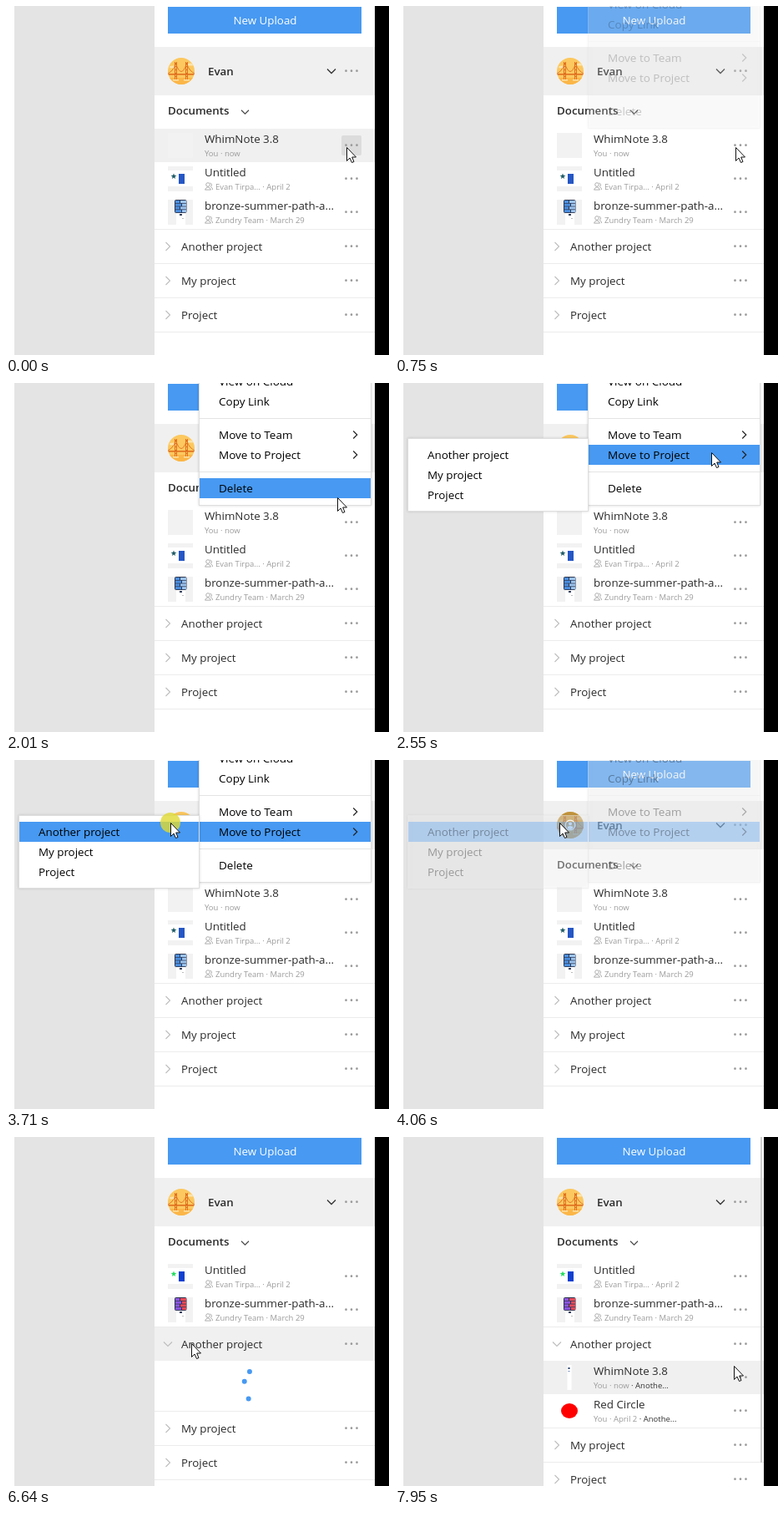
These frames come from a looping animation (459x418 px, 8000 ms). An HTML page with a canvas:

```html
<!DOCTYPE html>
<html lang="en">
<head>
<meta charset="utf-8">
<title>Move a document</title>
<style>
html, body { margin: 0; width: 100%; height: 100%; overflow: hidden; background: #fff; }
canvas { display: block; }
</style>
</head>
<body>
<canvas id="stage" width="459" height="418"></canvas>
<script>
const ctx = document.getElementById('stage').getContext('2d');
const LOOP = 8000;
const BLUE = '#4799f2', HOVER = '#f0f0f0', INK = '#2b2b2b', MUTED = '#9b9b9b';
const FACE = '"Open Sans", "Noto Sans", sans-serif';
const BODY = '13.35px ' + FACE, MENU = '13.5px ' + FACE;
const BOLD = '600 13.3px ' + FACE, SMALL = '9.5px ' + FACE;

const T = {
  press: 470, open: 750, sub: 2550, pick: 3710, close: 3860, moved: 4470,
  leave: 5370, tap: 6120, expand: 6250, loaded: 6970
};

// Pointer trips: start, number of 50 ms steps, end point, easing
const smooth = u => u * u * (3 - 2 * u);
const easeOut = u => u * (2 - u);
const HOME = [409, 169];
const trips = [
  { at: 1770, steps: 12, to: [380, 83], ease: smooth },
  { at: 2830, steps: 11, to: [198, 75], ease: smooth },
  { at: 5320, steps: 11, to: [223, 247], ease: easeOut },
  { at: 7590, steps: 8, to: [407, 274], ease: smooth }
];

const clamp = v => Math.max(0, Math.min(1, v));

function pointer(t) {
  let [x, y] = HOME;
  for (const m of trips) {
    if (t < m.at) break;
    const k = m.ease(clamp((Math.floor((t - m.at) / 50) + 1) / m.steps));
    x += (m.to[0] - x) * k;
    y += (m.to[1] - y) * k;
  }
  return [Math.round(x), Math.round(y)];
}

function rect(x, y, w, h, color) {
  ctx.fillStyle = color;
  ctx.fillRect(x, y, w, h);
}

function pill(x, y, w, h, r, color) {
  ctx.fillStyle = color;
  ctx.beginPath();
  ctx.roundRect(x, y, w, h, r);
  ctx.fill();
}

function disc(x, y, r, color, ry = r) {
  ctx.fillStyle = color;
  ctx.beginPath();
  ctx.ellipse(x, y, r, ry, 0, 0, 7);
  ctx.fill();
}

function line(points, color, width = 1) {
  ctx.strokeStyle = color;
  ctx.lineWidth = width;
  ctx.beginPath();
  points.forEach(([x, y], i) => i ? ctx.lineTo(x, y) : ctx.moveTo(x, y));
  ctx.stroke();
}

function text(s, x, y, font = BODY, color = INK) {
  ctx.font = font;
  ctx.fillStyle = color;
  ctx.fillText(s, x, y);
  return x + ctx.measureText(s).width;
}

function down(x, y, r, color, width) {
  line([[x - r, y - r / 2], [x, y + r / 2], [x + r, y - r / 2]], color, width);
}

function right(x, y, r, color, width) {
  line([[x - r / 2, y - r], [x + r / 2, y], [x - r / 2, y + r]], color, width);
}

function dots(y, p) {
  if (p && p[0] >= 402 && p[0] < 426 && Math.abs(p[1] - y) < 12)
    pill(402, y - 12, 24, 24, 2, '#dcdcdc');
  for (const x of [407.5, 414, 420.5]) disc(x, y - .3, 1.35, '#999');
}

function avatar(dim) {
  ctx.save();
  ctx.beginPath();
  ctx.arc(210, 78, 16, 0, 7);
  ctx.clip();
  rect(194, 62, 32, 32, '#fcc85f');
  disc(200, 73, 4, '#fde3a6', 1.5);
  disc(221, 70, 4, '#fde3a6', 1.5);
  rect(194, 86, 32, 8, '#fbb648');
  const red = '#e0701f';
  ctx.strokeStyle = red;
  ctx.lineWidth = .9;
  ctx.beginPath();
  ctx.moveTo(193, 81);
  ctx.quadraticCurveTo(200, 79, 203.5, 69);
  ctx.quadraticCurveTo(210, 88, 216.5, 69);
  ctx.quadraticCurveTo(220, 79, 227, 81);
  ctx.stroke();
  rect(194, 81, 32, 1.6, red);
  for (const x of [202, 215]) {
    rect(x, 67, 1, 21, red);
    rect(x + 2, 67, 1, 21, red);
    for (let y = 68; y < 88; y += 4) rect(x, y, 3, 1, red);
  }
  rect(200, 88, 7, 1.5, '#fde3a6');
  rect(213, 88, 7, 1.5, '#fde3a6');
  if (dim) {
    rect(194, 62, 32, 32, 'rgba(110,75,10,.42)');
    ctx.strokeStyle = '#fff';
    ctx.lineWidth = 1.3;
    ctx.beginPath();
    ctx.arc(210, 78, 5.8, 0, 7);
    ctx.stroke();
    disc(210, 76.5, 2, '#fff');
    disc(210, 81, 3.2, '#fff', 1.9);
  }
  ctx.restore();
}

function star(x, y, r, color) {
  ctx.fillStyle = color;
  ctx.beginPath();
  for (let i = 0; i < 10; i++) {
    const a = i * Math.PI / 5 - Math.PI / 2, q = i % 2 ? r * .42 : r;
    ctx.lineTo(x + q * Math.cos(a), y + q * Math.sin(a));
  }
  ctx.fill();
}

const thumbs = {
  blank(y) { rect(194, y, 30, 30, '#f2f2f2'); },
  flag(y, vivid) {
    rect(194, y, 30, 30, '#f2f2f2');
    rect(194, y + 5, 30, 19, '#fff');
    star(201, y + 12, 3.6, vivid ? '#1fdc5c' : '#1d5b66');
    rect(207, y + 9, 7, 12, vivid ? '#1040d0' : '#2556c4');
  },
  phone(y, vivid) {
    rect(194, y, 30, 30, '#f2f2f2');
    rect(204, y + 15, 11, 15, '#fff');
    pill(202, y, 14.5, 16, 2, '#2b3550');
    const set = vivid
      ? ['#8d55e0', '#f2c230', '#e84a58', '#3b7ff0', '#47b868']
      : ['#4b8fe0', '#ecc14e', '#9cc4ee', '#3a74c8', '#e3e6ec'];
    for (let i = 0; i < 8; i++) {
      const row = i >> 1, wide = (i + row) % 2;
      const x = i % 2 ? 216 - (wide ? 7 : 5) : 203;
      rect(x, y + 1 + row * 3.7, wide ? 7 : 5, 3, set[(i * 2 + row) % 5]);
    }
    rect(208, y + 17, 3, 2, '#35405c');
    rect(211, y + 22, 2, 1, '#bbb');
  },
  strip(y) {
    rect(206.5, y, 5, 30, '#fff');
    rect(207.5, y + 3, 2, 2, '#27406e');
    rect(207.5, y + 7, 2, 1, '#6b87b8');
  },
  circle(y) { disc(209, y + 15, 10, '#f00', 9); }
};

function people(x, y) {
  ctx.strokeStyle = MUTED;
  ctx.lineWidth = .8;
  ctx.beginPath();
  ctx.arc(x + 4, y - 5.5, 2.3, 0, 7);
  ctx.moveTo(x + .5, y + .6);
  ctx.quadraticCurveTo(x + 4, y - 6, x + 7.5, y + .6);
  ctx.closePath();
  ctx.moveTo(x + 6.5, y - 7.6);
  ctx.quadraticCurveTo(x + 10, y - 6, x + 7.4, y - 3);
  ctx.quadraticCurveTo(x + 9.8, y - 1.5, x + 9.6, y + .6);
  ctx.stroke();
}

const DOCS = [
  { name: 'WhimNote 3.8', note: 'You · now', thumb: 'blank' },
  { name: 'Untitled', note: 'Evan Tirpa... · April 2', thumb: 'flag', shared: true },
  { name: 'bronze-summer-path-a...', note: 'Zundry Team · March 29', thumb: 'phone', shared: true }
];
const INNER = [
  { name: 'WhimNote 3.8', note: 'You · now', thumb: 'strip', tail: true },
  { name: 'Red Circle', note: 'You · April 2', thumb: 'circle', tail: true }
];
const PROJECTS = ['Another project', 'My project', 'Project'];

function hoverRow(y, p) {
  if (p && p[0] > 178 && p[0] < 442 && p[1] >= y && p[1] < y + 40) rect(178, y, 264, 40, HOVER);
}

function docRow(d, y, p, vivid) {
  hoverRow(y, p);
  thumbs[d.thumb](y + 5, vivid);
  text(d.name, 238, y + 17);
  if (d.shared) people(238, y + 32.5);
  const end = text(d.note, d.shared ? 251 : 238, y + 33, SMALL, MUTED);
  if (d.tail) text(' · Anothe...', end, y + 33, SMALL, '#333');
  dots(y + 20, p);
}

// Dots enter at the bottom one after another and chase each other clockwise
function spinner(age) {
  for (let i = 0; i < 5; i++) {
    const a = age - i * 160;
    if (a < 0) break;
    const deg = 115 + 120 * easeOut(clamp(a / 560)) + Math.max(0, a - 450) * .1;
    const r = deg * Math.PI / 180;
    disc(310 + 24.8 * Math.cos(r), 298 + 24.8 * Math.sin(r), 3, BLUE);
  }
}

function panel(t, p) {
  rect(0, 0, 459, 418, '#fff');
  rect(10, 0, 168, 418, '#e4e4e4');
  rect(442, 0, 17, 418, '#000');
  rect(194, 1, 232, 32, BLUE);
  ctx.textAlign = 'center';
  text('New Upload', 310.5, 22, BODY, '#fff');
  ctx.textAlign = 'left';

  rect(178, 49, 264, 58, HOVER);
  avatar(t >= T.close && t < T.leave);
  text('Evan', 242, 83, BOLD);
  down(390, 78, 5, '#333', 1.3);
  dots(78, p);
  text('Documents', 194, 130, BOLD);
  down(286.5, 127, 4.5, '#444', 1.1);

  const moved = t >= T.moved;
  let y = 147;
  for (const d of moved ? DOCS.slice(1) : DOCS) {
    docRow(d, y, p, moved);
    y += 40;
  }
  rect(178, y, 264, 1, '#ececec');
  PROJECTS.forEach((name, i) => {
    y++;
    const open = i === 0 && t >= T.expand;
    hoverRow(y, p);
    if (open) down(194, y + 20, 5, '#bdbdbd', 1.1);
    else right(194, y + 20, 5, '#bdbdbd', 1.1);
    text(name, 210, y + 25);
    dots(y + 20, p);
    y += 40;
    if (open && t >= T.loaded) {
      for (const d of INNER) {
        docRow(d, y, p, true);
        y += 40;
      }
    } else if (open) {
      spinner(t - 6256);
      y += 60;
    }
    rect(178, y, 264, 1, '#ececec');
  });
  if (t >= T.loaded) rect(438, 0, 2, 390, '#cfcfcf');
}

function sheet(x, y, w, h) {
  ctx.save();
  ctx.shadowColor = 'rgba(0,0,0,.16)';
  ctx.shadowBlur = 3;
  rect(x, y, w, h, '#fff');
  ctx.restore();
  ctx.strokeStyle = '#dedede';
  ctx.lineWidth = 1;
  ctx.strokeRect(x + .5, y + .5, w - 1, h - 1);
}

function menu(t, [px, py]) {
  if (t < T.open || t > 4190) return;
  ctx.globalAlpha = clamp((t - 690) / 300) * (t < T.close ? 1 : clamp((4190 - t) / 380));
  sheet(231, -30, 207, 177);
  const inMenu = px >= 231;
  for (const top of [50, 74, 114]) {
    const chosen = top === 74 && t >= T.sub;
    if (chosen || (inMenu && py >= top && py < top + 24)) rect(232, top, 205, 24, BLUE);
  }
  rect(232, 42, 205, 1, '#e4e4e4');
  rect(232, 106, 205, 1, '#e4e4e4');
  const items = [['View on Cloud', 3], ['Copy Link', 27], ['Move to Team', 67],
    ['Move to Project', 91], ['Delete', 131]];
  for (const [s, y] of items) text(s, 255, y, MENU, '#000');
  right(418.5, 62, 4.5, '#222', 1.2);
  right(418.5, 86, 4.5, '#222', 1.2);

  if (t >= T.sub) {
    sheet(15, 66, 217, 88);
    if (!inMenu) rect(16, 74, 215, 24, BLUE);
    PROJECTS.forEach((s, i) => text(s, 39, 91 + 24 * i, BODY, '#000'));
  }
  ctx.globalAlpha = 1;
}

function pressMark(t, [x, y]) {
  for (const at of [T.press, T.pick, T.tap]) {
    const age = t - at;
    if (age >= 0 && age < 130 + (at === T.pick ? 20 : 0)) disc(x - 1, y, 12, 'rgba(222,218,50,.8)');
  }
}

function arrow([x, y]) {
  const shape = [[0, 0], [0, 16], [3.5, 12.5], [6, 18], [8.5, 17], [6.2, 11.5], [11, 11.5]];
  ctx.beginPath();
  for (const [dx, dy] of shape) ctx.lineTo(x + dx - .5, y + dy + .5);
  ctx.closePath();
  ctx.fillStyle = '#fff';
  ctx.fill();
  ctx.strokeStyle = '#111';
  ctx.lineWidth = 1;
  ctx.stroke();
}

function draw(t) {
  const p = pointer(t);
  const covered = t >= T.open && t < T.close;
  panel(t, covered ? null : p);
  menu(t, p);
  pressMark(t, p);
  arrow(p);
}

const start = performance.now();
function tick() {
  draw((performance.now() - start) % LOOP);
  requestAnimationFrame(tick);
}
tick();
</script>
</body>
</html>
```
